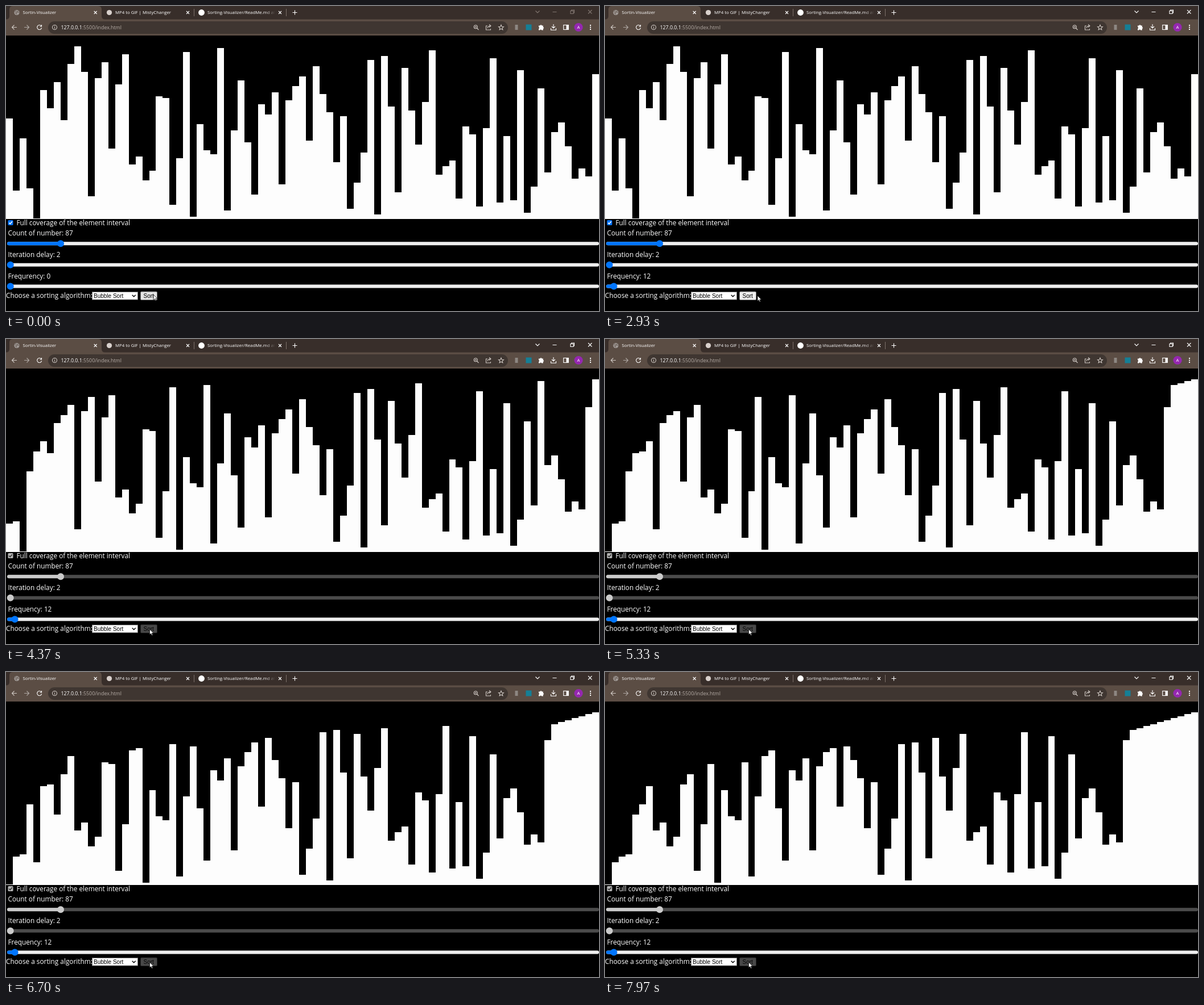
An HTML page for the animation above (8 s loop, 1042x537 px).

```html
<!DOCTYPE html>
<html lang="en">
<head>
<meta charset="utf-8">
<title>Sorting visualizer</title>
<style>
  html, body { margin: 0; width: 100%; height: 100%; overflow: hidden; background: #000; }
  svg { display: block; width: 100%; height: 100%; }
  text { font: 11.8px "Open Sans", sans-serif; fill: #fff; white-space: pre; }
  .tab { font-size: 7.8px; }
  .url { font-size: 8.8px; }
  .control { font: 10px "Liberation Sans", Arial, sans-serif; fill: #000; }
  .line { fill: none; stroke: #fff; stroke-width: 1.1; }
  .muted { stroke: #cfc8c3; }
</style>
</head>
<body>
<svg viewBox="0 0 1042 537">
  <defs>
    <linearGradient id="fade" gradientUnits="userSpaceOnUse" x1="455" x2="473">
      <stop stop-color="#fff"/><stop offset="1" stop-color="#fff" stop-opacity="0"/>
    </linearGradient>
  </defs>

  <!-- Browser chrome -->
  <path fill="#382e2a" d="M0 0H1042V24H0z"/>
  <path fill="#5b4d44" d="M0 23.5q6 0 6-6V6q0-6 6-6H162q6 0 6 6V17.5q0 6 6 6H1042V52H0z"/>
  <rect x="74" y="27" width="808" height="22" rx="11" fill="#3f3631"/>

  <circle cx="19" cy="11.5" r="4.6" fill="#a49e9a"/>
  <path d="M15.5 10q3-3 4 0t-2 2 2 3M21 8q-1 3 2 4" fill="none" stroke="#5b4d44"/>
  <circle cx="181.5" cy="11.5" r="4.6" fill="#d8d0cc"/>
  <circle cx="343.5" cy="11.5" r="5.4" fill="#fff"/>
  <text class="tab" x="29.5" y="14">Sortin-Visualizer</text>
  <text class="tab" x="192" y="14">MP4 to GIF | MistyChanger</text>
  <text class="tab" x="354" y="14" style="fill:url(#fade)">Sorting-Visualizer/ReadMe.md at m</text>
  <path class="line" d="M154.7 9l5 5m0-5l-5 5M317 9l5 5m0-5l-5 5M479 9l5 5m0-5l-5 5M503.5 11.5h8m-4-4v8"/>
  <path stroke="#7c706a" d="M330.5 5v13M492.5 5v13"/>
  <path id="windowButtons" class="line" stroke-width="1" d="M930.5 8.5l3.5 3.5 3.5-3.5M960.5 10.5h7M992 8.5h5v5h-5zM993.5 8.5v-1.5h5v5h-1.5M1023 7l6.5 6.5m0-6.5l-6.5 6.5"/>

  <path class="line muted" d="M19 37.5h-8.5m4-4l-4 4 4 4"/>
  <path class="line" stroke-opacity=".5" d="M32 37.5h8.5m-4-4l4 4-4 4"/>
  <path class="line" d="M61.8 35a4 4 0 1 0 .8 3.5M62.5 33v3h-3"/>
  <circle class="line muted" cx="85.5" cy="37.5" r="4"/>
  <path class="line muted" d="M85.5 37v2.8m0-4.9v1"/>
  <text class="url" x="96.5" y="41">127.0.0.1<tspan fill="#b5aca6">:5500/index.html</tspan></text>
  <g class="line muted">
    <circle cx="825.3" cy="36.8" r="3"/>
    <path d="M827.5 39l3 3M824 36.8h2.6m-1.3-1.3v2.6"/>
    <path d="M846 35h-2.5v7h8v-2M846 39q1-4 5-4m-2-2.5l3 2.5-3 2.5"/>
    <path d="M870 33.2l1.3 3 3.2.3-2.4 2.1.7 3.2-2.8-1.7-2.8 1.7.7-3.2-2.4-2.1 3.2-.3z"/>
  </g>
  <rect x="894.5" y="33" width="5" height="9" fill="#8d8782"/>
  <rect x="913.5" y="32.5" width="10" height="10" fill="#157f96"/>
  <path fill="#fff" d="M936 34.5h2.4a1.7 1.7 0 0 1 3.2 0h2.2v2.4a1.7 1.7 0 0 1 0 3.2v2.4h-2.6a1.6 1.6 0 0 0-3 0H936v-2.6a1.6 1.6 0 0 0 0-3z"/>
  <path class="line" stroke-width="1.5" d="M962 32v7m-3-3l3 3 3-3M957.5 39v3.3h9V39"/>
  <rect class="line" x="979.7" y="33.5" width="8.6" height="8"/>
  <path fill="#fff" d="M984.5 33.5h4v8h-4z"/>
  <circle cx="1006" cy="37.5" r="7.6" fill="#9527b0"/>
  <text class="tab" x="1006" y="40.3" text-anchor="middle">A</text>
  <path stroke="#fff" stroke-width="2" stroke-dasharray="2 1.5" d="M1027 33v9"/>

  <!-- Page -->
  <path fill="#000" d="M0 52H1042V537H0z"/>
  <path id="bars" fill="#fdfdfd" shape-rendering="crispEdges"/>
  <rect id="box" x="3.5" y="377" width="9" height="9" rx="1.5"/>
  <path id="check" fill="none" stroke-width="1.5" d="M5.3 381.6l2 2 3.6-4.3"/>
  <text x="18.5" y="386">Full coverage of the element interval</text>
  <text x="3.5" y="404">Count of number: 87</text>
  <text x="3.5" y="442">Iteration delay: 2</text>
  <text id="frequency" x="3.5" y="479.5"></text>
  <g id="sliders"></g>
  <text x="0" y="513.5">Choose a sorting algorithm:</text>
  <rect x="151.5" y="503.5" width="80" height="13.5" fill="#fff" stroke="#767676"/>
  <text class="control" x="154" y="514">Bubble Sort</text>
  <path fill="none" stroke="#000" stroke-width="1.4" d="M221.7 508.8l3 3 3-3"/>
  <g id="button">
    <rect x="236.5" y="503" width="29" height="14.5" rx="1.5" stroke="#767676"/>
    <text class="control" x="241.5" y="514">Sort</text>
  </g>
  <path id="cursor" fill="#fff" stroke="#000" stroke-width=".7" d="M0 0V9.5L2.2 7.5 3.8 11 5.3 10.3 3.8 7H6.8z"/>
</svg>
<script>
const LOOP = 8000, FPS = 30, WIDTH = 1042;
const SORT_START = 105;
const values = [
  50, 14, 40, 15, 0, 64, 55, 68, 49, 77, 86, 73, 11, 70, 78, 35, 67, 82, 27, 31, 19, 24,
  61, 60, 7, 30, 83, 1, 47, 34, 32, 85, 4, 44, 69, 38, 12, 57, 52, 63, 17, 59, 66, 71,
  39, 76, 62, 53, 28, 51, 5, 18, 33, 79, 2, 81, 56, 13, 75, 54, 37, 58, 84, 22, 26, 29,
  10, 46, 42, 6, 45, 80, 8, 41, 9, 74, 3, 16, 65, 23, 43, 48, 36, 20, 25, 21, 72
];

// [tick, comparisons done]
const progress = [[SORT_START, 0], [131, 164], [160, 347], [182, 480], [220, 720], [239, 839]];
// [ms, x, y]
const cursorPath = [
  [30, 259, 508], [830, 8, 492], [870, 8, 492], [1500, 14, 492], [1800, 14, 492],
  [2100, 16, 494], [2470, 16, 494], [2900, 268, 510], [2960, 268, 510], [3230, 252.5, 511]
];
const frequencyPath = [[870, 0], [1500, 10], [1800, 10], [2100, 12]];

const el = id => document.getElementById(id);

function along(points, t) {
  if (t <= points[0][0]) return points[0].slice(1);
  const next = points.findIndex(p => p[0] > t);
  if (next < 0) return points.at(-1).slice(1);
  const a = points[next - 1], b = points[next];
  const k = (t - a[0]) / (b[0] - a[0]);
  return a.slice(1).map((v, i) => v + (b[i + 1] - v) * k);
}

function bubbleSort(list, comparisons) {
  const a = [...list];
  for (let end = a.length - 1; end > 0; end--)
    for (let j = 0; j < end; j++) {
      if (comparisons-- <= 0) return a;
      if (a[j] > a[j + 1]) [a[j], a[j + 1]] = [a[j + 1], a[j]];
    }
  return a;
}

function barsPath(list) {
  const step = WIDTH / list.length;
  return "M0 374.5" + list.map((v, i) =>
    `V${(374.2 - v * 3.531).toFixed(1)}H${Math.round((i + 1) * step)}`).join("") + "V374.5z";
}

function slider(x, y, disabled) {
  const [track, accent] = disabled ? ["#4b4b4b", "#cbcbcb"] : ["#efefef", "#0075ff"];
  return `<rect x="2" y="${y - 3}" width="1040" height="6" rx="3" fill="${track}"/>
    <rect x="2" y="${y - 3}" width="${x - 2}" height="6" rx="3" fill="${accent}"/>
    <circle cx="${x}" cy="${y}" r="6" fill="${accent}"/>`;
}

function draw(t) {
  const tick = Math.floor((t + 4) * FPS / 1000);
  const time = tick * 1000 / FPS;
  const sorting = tick >= SORT_START;
  const [x, y] = along(cursorPath, time);
  const frequency = Math.round(along(frequencyPath, time)[0]);
  const hover = x > 236 && x < 266 && y > 502;

  el("bars").setAttribute("d", barsPath(bubbleSort(values, Math.round(along(progress, tick)[0]))));
  el("frequency").textContent = (frequency ? "Frequency: " : "Frequrency: ") + frequency;
  el("sliders").innerHTML = slider(96, 418.2, sorting) + slider(7.7, 455.8, sorting)
    + slider(7.7 + frequency * .65, 493.6, false);
  el("box").setAttribute("fill", sorting ? "#b4b4b4" : "#0075ff");
  el("check").setAttribute("stroke", sorting ? "#333" : "#fff");
  el("button").setAttribute("fill", hover && !sorting ? "#e5e5e5" : "#efefef");
  el("button").setAttribute("opacity", sorting ? .3 : 1);
  el("cursor").setAttribute("transform", `translate(${x} ${y})`);
  el("windowButtons").style.stroke = tick < 1 ? "#80756f" : "#fff";
}

const start = performance.now();
function frame() {
  draw((performance.now() - start) % LOOP);
  requestAnimationFrame(frame);
}
frame();
</script>
</body>
</html>
```
